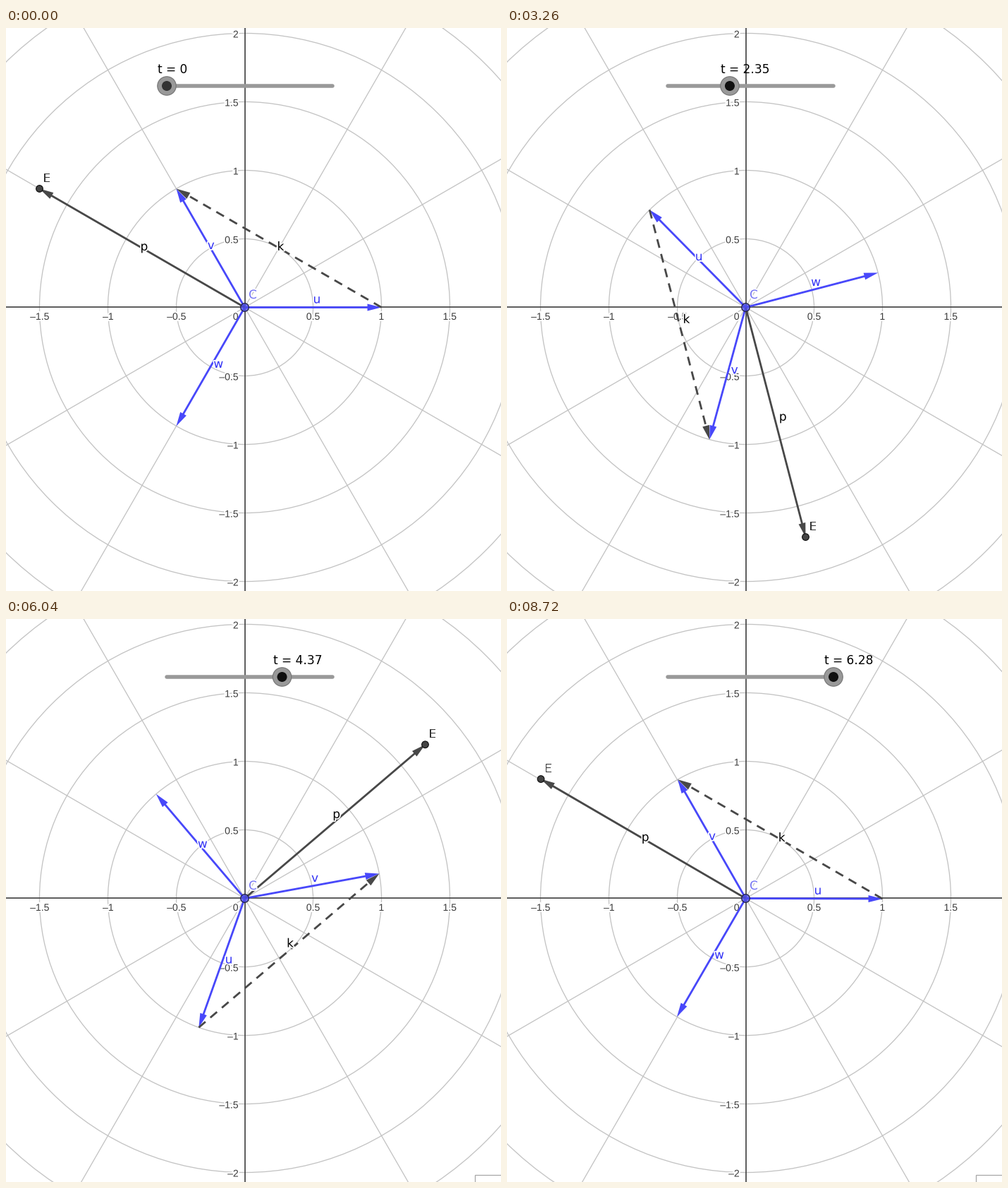
Write a matplotlib script that moves like this. It is 702 px wide and 797 px high and loops after 8.79 s.

```python
import numpy as np
import matplotlib.pyplot as plt
from matplotlib.animation import FuncAnimation
from matplotlib.patches import Circle, PathPatch, Polygon, Rectangle
from matplotlib.path import Path
from matplotlib.patheffects import withStroke
from matplotlib.textpath import TextPath

W, H = 702, 797
LOOP, STEP = 8790, 30
ORIGIN = np.array([338.5, 395.5])
UNIT = 194
T_MAX = 6.28
BLUE, DARK, GRID = "#4848fa", "#484848", "#c3c3c3"
HALO = [withStroke(linewidth=3.5, foreground="white")]

# 72 dpi makes one point equal one pixel
fig = plt.figure(figsize=((W + 0.01) / 72, (H + 0.01) / 72), dpi=72, facecolor="white")
ax = fig.add_axes([0, 0, 1, 1])
ax.set_xlim(0, W)
ax.set_ylim(H, 0)
ax.axis("off")


def screen(x, y):
    return ORIGIN + UNIT * np.array([x, -y])


def polar(angle, r=1.0):
    return screen(r * np.cos(angle), r * np.sin(angle))


def glyphs(text, x, baseline, align):
    """Tick label outline; align is 0.5 for centred, 1 for right."""
    path = TextPath((0, 0), text, size=14, prop={"family": "Liberation Sans"})
    box = path.get_extents()
    left = x - box.x0 - align * box.width
    return Path(path.vertices * [1, -1] + [left, baseline], path.codes)


def draw_grid():
    for n in range(1, 6):
        ax.add_patch(Circle(ORIGIN, n * UNIT / 2, fill=False, ec=GRID, lw=1.3, zorder=1))
    for deg in range(0, 360, 30):
        if deg % 90:
            ax.plot(*zip(ORIGIN, polar(np.radians(deg), 3.5)), color=GRID, lw=1.3, zorder=1)

    labels = [glyphs("0", 329, 413, 1)]
    for v in np.arange(-2, 2.5, 0.5):
        if v == 0:
            continue
        text = f"{v:g}".replace("-", "–")
        x, y = screen(v, v)
        labels.append(glyphs(text, 329, y + 6, 1))
        if abs(v) < 2:
            labels.append(glyphs(text, x, 413, 0.5))
    ticks = Path.make_compound_path(*labels)
    ax.add_patch(PathPatch(ticks, fc="none", ec="white", lw=4, zorder=2))
    ax.add_patch(PathPatch(ticks, fc="#3c3c3c", ec="none", zorder=2.1))

    ax.plot([0, W], [ORIGIN[1]] * 2, color="#444444", lw=1.7, zorder=2.2)
    ax.plot([ORIGIN[0]] * 2, [0, H], color="#444444", lw=1.7, zorder=2.2)


def label(text, color, zorder=8, x=0, y=0, halo=True):
    return ax.text(x, y, text, color=color, size=17, family="DejaVu Sans",
                   va="baseline", ha="left", zorder=zorder,
                   path_effects=HALO if halo else None)


class Arrow:
    HEAD = 20

    def __init__(self, name, color, text_color, zorder, dashed=False):
        style = (0, (12.5 / 2.8, 9 / 2.8)) if dashed else "-"
        self.line, = ax.plot([], [], color=color, lw=2.8, ls=style, zorder=zorder,
                             solid_capstyle="butt", dash_capstyle="butt")
        self.head = ax.add_patch(Polygon(np.zeros((3, 2)), fc=color, ec="none",
                                         zorder=zorder))
        self.label = label(name, text_color)

    def place(self, start, end):
        d = (end - start) / np.hypot(*(end - start))
        normal = np.array([d[1], -d[0]])
        base = end - self.HEAD * d
        side = normal * self.HEAD / 4
        self.line.set_data(*zip(start, base + d))
        self.head.set_xy([end, base + side, base - side])
        self.label.set_position((start + end) / 2 + 5 * normal + [0, -1])


draw_grid()

# slider
ax.plot([228, 463], [82, 82], color="#999999", lw=5.5, solid_capstyle="round", zorder=3)
knob = ax.add_patch(Circle((228, 82), 13.2, fc="#999999", ec="#777777", lw=1.2, zorder=3.1))
pin = ax.add_patch(Circle((228, 82), 7, ec="none", zorder=3.2))
t_label = label("", "black", 3.3, halo=False)

u, v, w = (Arrow(name, BLUE, "#3333f5", 4) for name in "uvw")
k = Arrow("k", DARK, "black", 5, dashed=True)
p = Arrow("p", DARK, "black", 5)

ax.add_patch(Circle(ORIGIN, 5.8, fc=(0.3, 0.3, 0.95, 0.75), ec="#222244", lw=1.3, zorder=6))
label("C", "#7474f4", 7, 344, 383)
tip = ax.add_patch(Circle((0, 0), 4.8, fc="#444444", ec="#111111", lw=1.2, zorder=6))
tip_label = label("E", "#333333")
corner = ax.add_patch(Rectangle((665, 787), 60, 30, fc="white", ec="#a8a8a8", lw=1.3, zorder=9))


def slider_value(ms):
    times = [0, 1350, 2370, 4110, 5190, 6810, 8700]
    values = [0, 0.97, 1.72, 2.99, 3.77, 4.92, T_MAX]
    return round(float(np.interp(ms, times, values)), 2)


def update(i):
    ms = i * STEP
    t = slider_value(ms)

    x = 228 + 235 * t / T_MAX
    knob.center = pin.center = (x, 82)
    pin.set_facecolor("#333333" if t == 0 else "#101010")
    t_label.set_text(f"t = {t:g}")
    t_label.set_position((x - 13, 63.5))

    a, b, c = (polar(t + n * 2 * np.pi / 3) for n in range(3))
    e = ORIGIN + b - a
    for arrow, end in ((u, a), (v, b), (w, c), (p, e)):
        arrow.place(ORIGIN, end)
    k.place(a, b)
    tip.center = e
    tip_label.set_position(e + [5, -9.5])
    corner.set_visible(ms >= 4900)
    return []


anim = FuncAnimation(fig, update, frames=LOOP // STEP, interval=STEP,
                     repeat=True, repeat_delay=0, blit=False)
plt.show()
```
